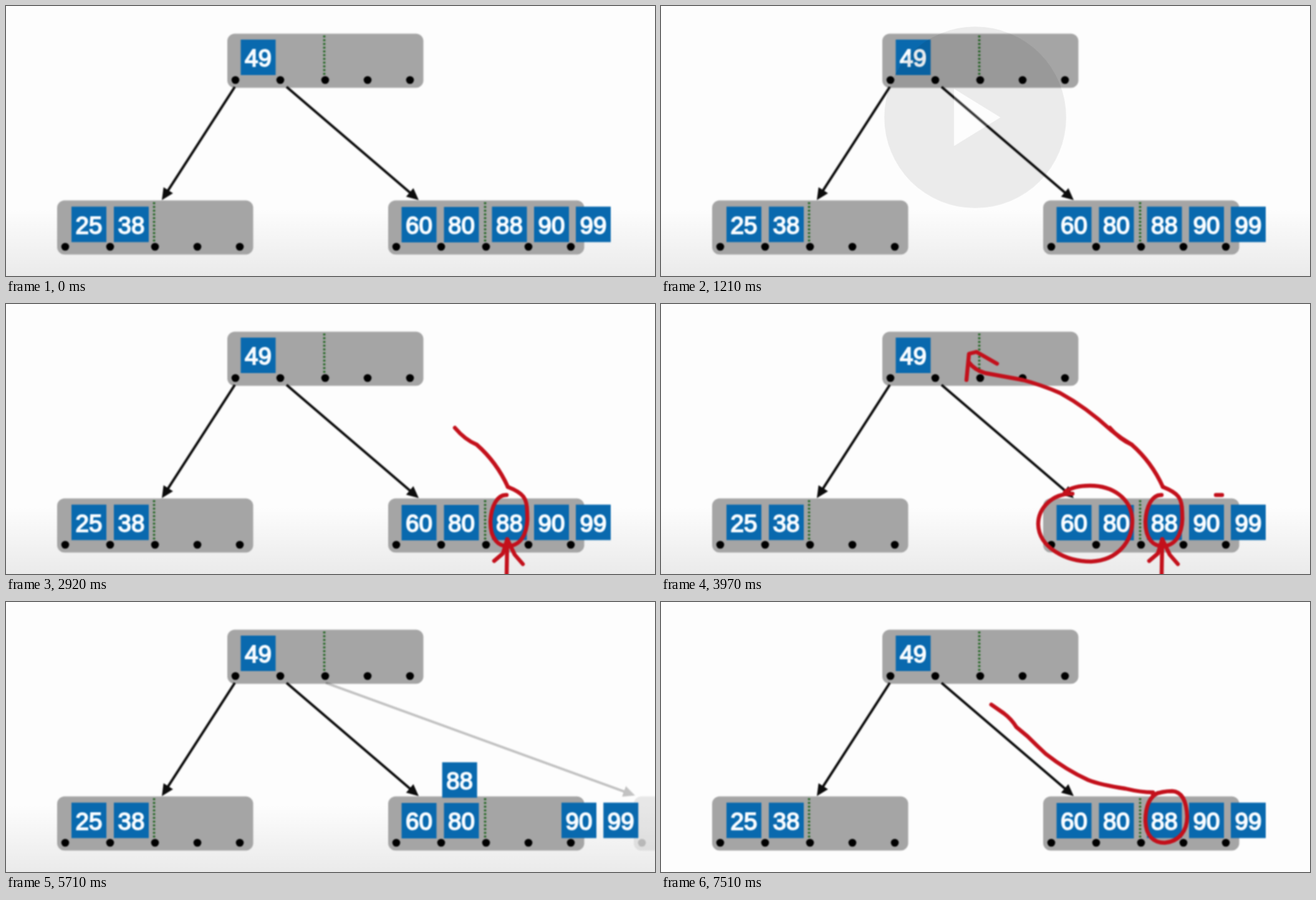
These frames come from a looping animation (1041x434 px, 7.58 s). An HTML page:

```html
<!DOCTYPE html>
<html lang="en">
<head>
<meta charset="utf-8">
<title>B-tree node split</title>
<style>
  html, body { margin: 0; height: 100%; overflow: hidden; background: #fdfdfd; }
  svg { display: block; width: 100vw; height: 100vh; }
  #slide { filter: blur(1.1px); }
  .node { fill: #a5a5a5; }
  .middle { stroke: #1f651f; stroke-width: 3.6; stroke-dasharray: 3 3; }
  .key rect { fill: #0969ae; }
  .key text { fill: #f8fcff; stroke: #f8fcff; stroke-width: 1.9; font: 38.5px "Liberation Sans", Arial, sans-serif; text-anchor: middle; }
  .arrow { fill: #0c0c0c; stroke: #0c0c0c; }
  #ink path { fill: none; stroke: #c3101b; stroke-width: 6.4; stroke-linecap: round; stroke-linejoin: round; }
</style>
</head>
<body>
<svg viewBox="0 0 1041 434" preserveAspectRatio="none">
  <defs>
    <linearGradient id="fade" x1="0" y1="0" x2="0" y2="1">
      <stop offset="0" stop-opacity="0"/>
      <stop offset="1" stop-opacity=".075"/>
    </linearGradient>
  </defs>
  <rect width="1041" height="434" fill="#fdfdfd"/>
  <rect id="shade" y="325" width="1041" height="109" fill="url(#fade)"/>
  <g id="slide">
    <g id="tree"></g>
    <g id="added"></g>
    <g id="keys"></g>
    <g id="ink"></g>
  </g>
  <g id="play">
    <circle r="79.3" opacity=".45"/>
    <path d="M-18.5 -25V25L22 0Z" fill="#fff"/>
  </g>
</svg>
<script>
const LOOP = 7580;
// The picture only changes at these moments and holds in between.
const STEPS = [0, 810, 930, 1060, 1210, 1340, 1890, 2010, 2130, 2280, 2400, 2530, 2680, 2800, 2920,
  3070, 3190, 3340, 3460, 3580, 3730, 3850, 3970, 4120, 4240, 4510, 5030,
  5580, 5710, 5830, 5980, 6110, 6240, 6910, 7060, 7180, 7310, 7460, 7510];
const CLEAR = 5030, RESTART = 6910;

const byId = id => document.getElementById(id);
const [tree, added, keys, ink, shade, play] = ['tree', 'added', 'keys', 'ink', 'shade', 'play'].map(byId);

function add(parent, tag, attributes) {
  const element = document.createElementNS('http://www.w3.org/2000/svg', tag);
  for (const name in attributes) element.setAttribute(name, attributes[name]);
  return parent.appendChild(element);
}

function addNode(parent, x, y) {
  add(parent, 'rect', { class: 'node', x, y, width: 314.5, height: 87, rx: 12 });
  add(parent, 'path', { class: 'middle', d: `M${x + 155.5} ${y + 3}v66` });
  for (const dx of [13, 85, 157, 225, 293])
    add(parent, 'circle', { cx: x + dx, cy: y + 74.5, r: 6.3 });
}

function addArrow(parent, x1, y1, x2, y2) {
  const angle = Math.atan2(y2 - y1, x2 - x1) * 180 / Math.PI;
  const length = Math.hypot(x2 - x1, y2 - y1);
  const g = add(parent, 'g', { class: 'arrow', transform: `translate(${x1} ${y1}) rotate(${angle})` });
  add(g, 'path', { d: `M0 0H${length - 15}`, 'stroke-width': 4 });
  add(g, 'path', { d: `M${length} 0l-19 -9v18z`, stroke: 'none' });
}

function addKey(value, x, y) {
  const g = add(keys, 'g', { class: 'key', transform: `translate(${x} ${y})` });
  add(g, 'rect', { width: 56, height: 57 });
  add(g, 'text', { x: 28, y: 43 }).textContent = value;
  return g;
}

addNode(tree, 355, 44.5);
addNode(tree, 82, 312.5);
addNode(tree, 613, 312.5);
addArrow(tree, 367, 130, 250, 312);
addArrow(tree, 450, 130, 662, 312);
addNode(added, 1007, 312.5);
addArrow(added, 513, 130, 1009, 311);

addKey(49, 376.5, 54);
addKey(25, 105, 322.5);
addKey(38, 173, 322.5);
addKey(60, 634.5, 323);
addKey(80, 702.5, 323);
const moving = [
  { from: [779.5, 322.5], to: [449, 54], value: 88 },
  { from: [847, 322.5], to: [1029, 322.5], value: 90 },
  { from: [914, 322.5], to: [1097, 322.5], value: 99 },
].map(key => ({ ...key, element: addKey(key.value, ...key.from) }));

// Pen strokes: start, end, path, time of erasing.
const strokes = [
  [1780, 2000, 'M803 437L804 378'],
  [1990, 2130, 'M783 413L797 401L804 378L816 403L829 418'],
  [2180, 2600, 'M803 307C788 306 778 325 777 350C777 378 790 391 808 389C830 386 838 362 836 335C836 312 830 304 805 294'],
  [2600, 2920, 'M805 294C796 274 780 248 755 226Q736 218 720 199'],
  [2920, 3220, 'M755 226Q738 216 722 203Q682 166 640 143Q610 130 580 122L520 111Q503 106 494 94'],
  [3230, 3400, 'M490 122L494 80L506 77L539 96'],
  [3400, 3850, 'M660 305C628 304 605 328 605 354C606 392 650 414 690 414C732 412 757 382 756 346C754 312 724 292 688 292Q662 292 648 302'],
  [3950, 3970, 'M900 307H890'],
  [3990, 4260, 'M890 307C860 312 843 332 843 358C844 395 880 418 920 416C965 414 991 385 989 350C987 318 950 293 900 298'],
  [7010, 7330, 'M797 307C782 314 777 332 777 352C778 376 790 387 808 387C831 385 844 368 844 345C843 320 836 305 820 304Q804 304 789 310', LOOP],
  [7330, 7512, 'M789 306Q770 306 745 300Q705 294 685 286Q650 270 617 244Q602 230 588 216L570 201Q562 188 550 179L527 163', LOOP],
].map(([start, end, d, erase = CLEAR]) =>
  ({ start, end, erase, element: add(ink, 'path', { d, pathLength: 1 }) }));

const progress = (t, start, end) => Math.min(1, Math.max(0, (t - start) / (end - start)));
const smooth = p => p * p * (3 - 2 * p);

function draw(t) {
  for (const { start, end, erase, element } of strokes) {
    const p = progress(t, start, end);
    element.style.display = p > 0 && t < erase ? '' : 'none';
    element.setAttribute('stroke-dasharray', p < 1 ? `${p} 2` : 'none');
  }

  const split = t < RESTART ? smooth(progress(t, 5470, 6220)) : 0;
  added.setAttribute('opacity', split);
  for (const { from, to, element } of moving) {
    const [x, y] = from.map((start, i) => start + (to[i] - start) * split);
    element.setAttribute('transform', `translate(${x} ${y})`);
  }

  const burst = progress(t, 685, 1310);
  play.setAttribute('transform', `translate(504 179) scale(${1 + burst})`);
  play.setAttribute('opacity', t >= 810 ? 1 - burst : 0);
  shade.setAttribute('opacity', t < RESTART ? 1 : 0);
}

const began = performance.now();
function frame() {
  const t = (performance.now() - began) % LOOP;
  draw(STEPS.findLast(step => step <= t));
  requestAnimationFrame(frame);
}
frame();
</script>
</body>
</html>
```
